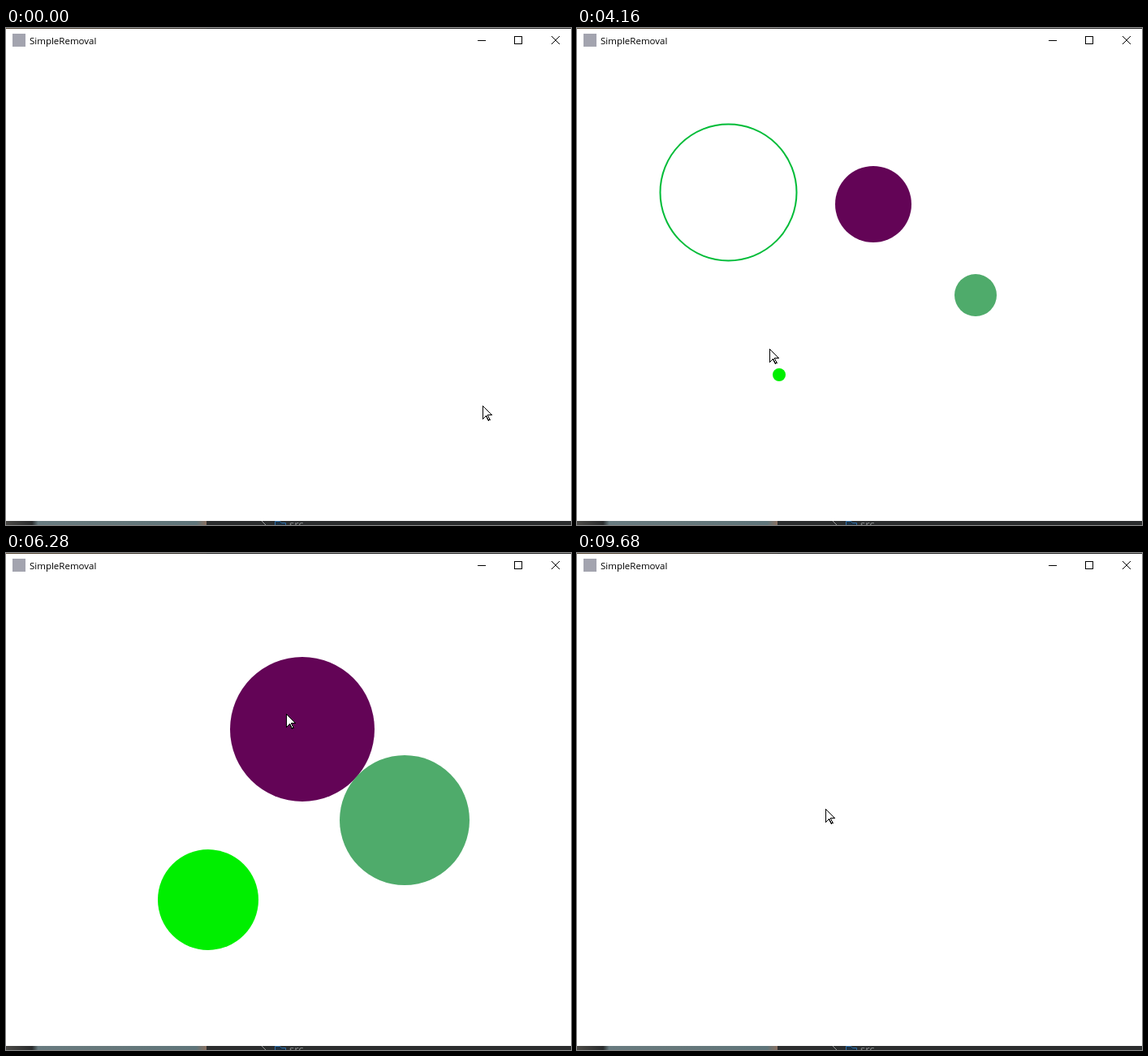
An HTML page for the animation above (9.88 s loop, 696 by 612 pixels).

```html
<!DOCTYPE html>
<html lang="en">
<head>
<meta charset="utf-8">
<title>SimpleRemoval</title>
<style>
  html, body { margin: 0; width: 100%; height: 100%; overflow: hidden; background: #fff; }
  svg { display: block; width: 696px; height: 612px; }
  text { font-family: "Open Sans", "Noto Sans", sans-serif; }
</style>
</head>
<body>
<svg viewBox="0 0 696 612">
  <defs>
    <linearGradient id="photo">
      <stop offset="0" stop-color="#4b4a47"/>
      <stop offset=".13" stop-color="#292b2c"/>
      <stop offset=".16" stop-color="#687b80"/>
      <stop offset=".5" stop-color="#66787b"/>
      <stop offset=".95" stop-color="#5f757a"/>
      <stop offset="1" stop-color="#8a7060"/>
    </linearGradient>
    <linearGradient id="edge">
      <stop offset="0" stop-color="#574733"/>
      <stop offset="1" stop-color="#302d29"/>
    </linearGradient>
  </defs>
  <rect width="696" height="612" fill="#fff"/>

  <rect width="696" height="1" fill="#292929"/>
  <rect width="247" height="1" fill="url(#edge)"/>
  <rect x="8" y="7" width="16" height="16" fill="#a3a4af"/>
  <text x="29" y="20" font-size="11.5">SimpleRemoval</text>
  <g fill="none" stroke="#000">
    <path d="M581 15.5h10M626.5 10.5h9v9h-9z" shape-rendering="crispEdges"/>
    <path d="M672 10l10 10M682 10l-10 10"/>
  </g>

  <g id="shapes"></g>

  <rect y="607" width="696" height="5" fill="#2b2d2e"/>
  <rect y="607" width="247" height="5" fill="url(#photo)"/>
  <path d="M315 607l5 5" stroke="#999" fill="none"/>
  <path d="M331.5 612v-4.5h6l2 2h5v3" stroke="#2f6ea8" fill="#1d3040"/>
  <text x="349" y="616" font-size="13" fill="#8d9092">src</text>

  <path id="cursor" d="M.5 .5V16.5L4.5 12.5 7.5 18.5 9 17.5 6.5 11.5H11.5Z" fill="#fff" stroke="#000" shape-rendering="crispEdges"/>
</svg>
<script>
const LOOP = 9880, TICK = 20;
const GROWTH = 0.0256, MAX_RADIUS = 95;
const HOLD = 120, SETTLE = 30, GLIDE = 700;

// Each circle is placed by one click and removed by a later one.
const circles = [
  { x: 186.5, y: 202.5, color: '#00bc38', outline: true, born: 860, removed: 5150, grab: { x: 179, y: 251 } },
  { x: 365, y: 217, color: '#630456', born: 2318, removed: 6400, grab: { x: 345, y: 198 } },
  { x: 491, y: 329, color: '#4fab6b', born: 3140, removed: 7190, grab: { x: 480, y: 325 } },
  { x: 249, y: 427, color: '#00ef00', born: 3852, removed: 8240, grab: { x: 252, y: 411 } }
];

const visits = [
  { at: -HOLD, x: 587, y: 465 },
  ...circles.map(c => ({ at: c.born, x: c.x + 1, y: c.y })),
  ...circles.map(c => ({ at: c.removed, ...c.grab })),
  { at: 9680, x: 306, y: 315 }
];

const shapes = document.getElementById('shapes');
const cursor = document.getElementById('cursor');

for (const c of circles) {
  c.node = document.createElementNS('http://www.w3.org/2000/svg', 'circle');
  const attrs = { cx: c.x, cy: c.y, fill: c.outline ? 'none' : c.color };
  if (c.outline) Object.assign(attrs, { stroke: c.color, 'stroke-width': 2 });
  for (const key in attrs) c.node.setAttribute(key, attrs[key]);
  shapes.append(c.node);
}

// Grows to the limit, then shrinks at the same rate.
function radiusAt(age) {
  return Math.round(MAX_RADIUS - Math.abs(MAX_RADIUS - age * GROWTH));
}

// Holds briefly after each click, then glides to the next spot and waits there.
function pointerAt(t) {
  const from = visits.findLast(v => v.at <= t);
  const to = visits[visits.indexOf(from) + 1] || from;
  const glide = Math.min(GLIDE, to.at - from.at - HOLD - SETTLE);
  const u = Math.min(1, Math.max(0, (t - from.at - HOLD) / glide));
  const k = to === from ? 0 : u * u * (3 - 2 * u);
  const mix = axis => Math.floor(from[axis] + (to[axis] - from[axis]) * k);
  return [mix('x'), mix('y')];
}

function render(t) {
  for (const c of circles) {
    const alive = t >= c.born && t < c.removed;
    c.node.setAttribute('visibility', alive ? 'visible' : 'hidden');
    if (alive) c.node.setAttribute('r', radiusAt(t - c.born));
  }
  cursor.setAttribute('transform', `translate(${pointerAt(t)})`);
}

const start = performance.now();
function frame() {
  const t = (performance.now() - start) % LOOP;
  render(Math.floor(t / TICK) * TICK);
  requestAnimationFrame(frame);
}
frame();
</script>
</body>
</html>
```
